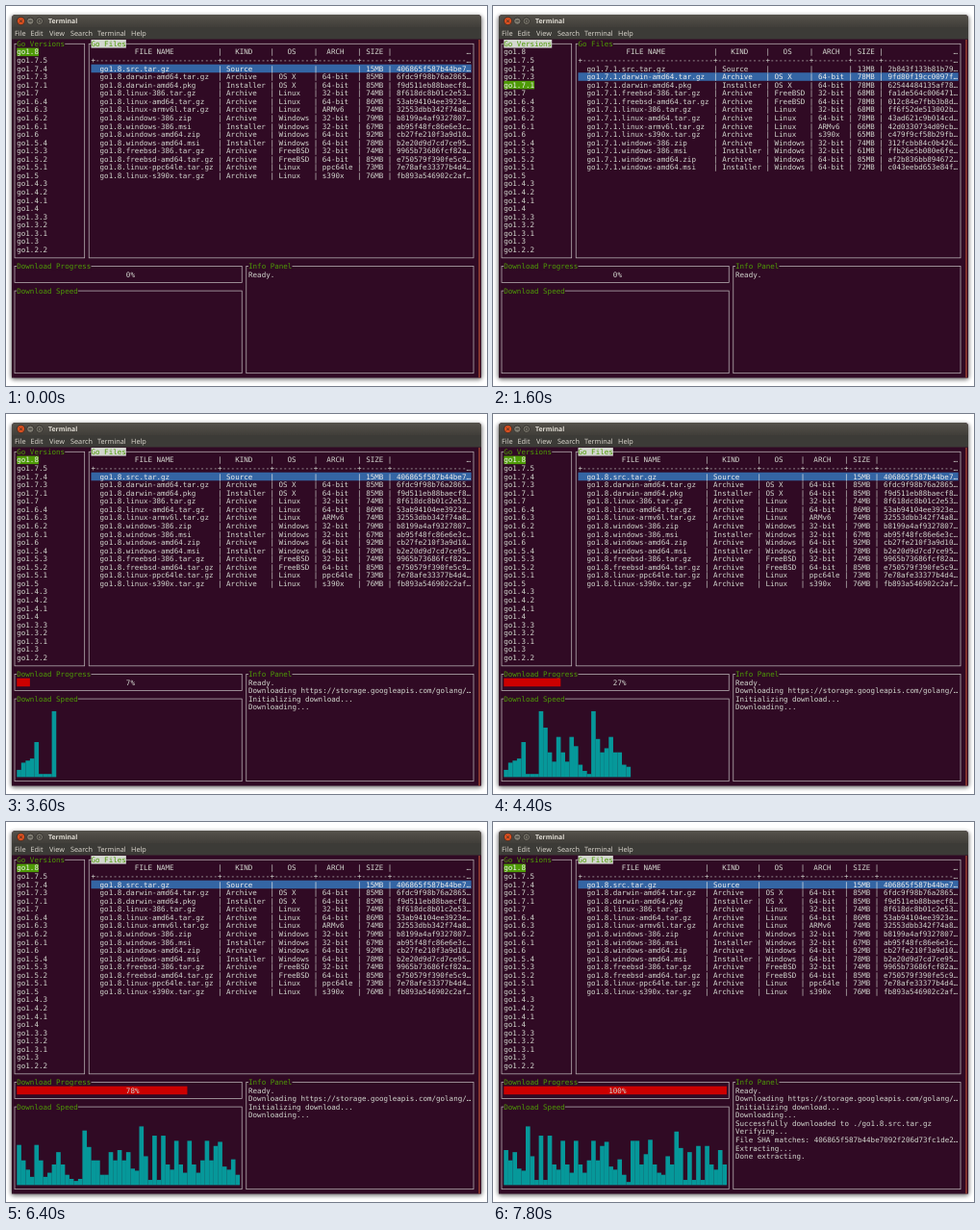
These frames come from a looping animation (500 by 395 pixels, 8 s). An HTML page:

```html
<!DOCTYPE html>
<html lang="en">
<head>
<meta charset="utf-8">
<title>Terminal</title>
<style>
  html, body { margin: 0; width: 100%; height: 100%; overflow: hidden; background: #fff; }
  svg { display: block; width: 500px; height: 395px; }
  text { white-space: pre; text-rendering: geometricPrecision; }
  #screen { font: 7.546px "DejaVu Sans Mono", monospace; }
  #chrome { font: 7.3px "Open Sans", sans-serif; fill: #dfdbd2; }
</style>
</head>
<body>
<svg viewBox="0 0 500 395">
  <defs>
    <linearGradient id="bar" x2="0" y2="1">
      <stop stop-color="#55524b"/><stop offset="1" stop-color="#3f3d38"/>
    </linearGradient>
    <filter id="blur"><feGaussianBlur stdDeviation="2.2"/></filter>
  </defs>
  <rect width="500" height="395" fill="#fff"/>
  <rect x="5" y="10" width="490" height="378.5" rx="4" fill="#000" opacity=".55" filter="url(#blur)"/>
  <path d="M6 386.4V13q0-4 4-4H490q4 0 4 4V386.4Z" fill="#300a24"/>
  <g id="chrome">
    <path d="M6 23V13q0-4 4-4H490q4 0 4 4V23Z" fill="url(#bar)"/>
    <rect x="6" y="22" width="488" height="12.5" fill="#3c3b37"/>
    <g stroke="#2b2925" stroke-width=".8">
      <circle cx="15.5" cy="15.7" r="4" fill="#e2511f"/>
      <circle cx="25.3" cy="15.7" r="3.7" fill="#7d7a70"/>
      <circle cx="34.8" cy="15.7" r="3.7" fill="#7d7a70"/>
      <path d="M14 14.2l3 3m0-3l-3 3M23.7 15.7h3.2M33.3 14.4h3v2.6h-3z" fill="none"/>
    </g>
    <text x="44" y="18.4" font-size="6.9" font-weight="700">Terminal</text>
    <text y="31"><tspan x="9">File</tspan><tspan x="25.5">Edit</tspan><tspan x="45">View</tspan><tspan x="67">Search</tspan><tspan x="95">Terminal</tspan><tspan x="130">Help</tspan></text>
  </g>
  <rect x="491.3" y="35" width="1.4" height="351.4" fill="#a0402f"/>
  <g id="screen"></g>
</svg>
<script>
const LOOP = 8000, TICK = 200;
const CELL = 4.543, ROW = 8.56, LEFT = 6.73, TOP = 35;
const BG = '#300a24', FG = '#d3d7cf', LINE = '#bcb6b8', GREEN = '#4e9a06', BLUE = '#3465a4', RED = '#cc0000', CYAN = '#06989a';

const versions = ('1.8 1.7.5 1.7.4 1.7.3 1.7.1 1.7 1.6.4 1.6.3 1.6.2 1.6.1 1.6 1.5.4 1.5.3 ' +
  '1.5.2 1.5.1 1.5 1.4.3 1.4.2 1.4.1 1.4 1.3.3 1.3.2 1.3.1 1.3 1.2.2').split(' ').map(v => 'go' + v);

const newest = `src.tar.gz 15 406865f587b44be7
darwin-amd64.tar.gz 85 6fdc9f98b76a2865
darwin-amd64.pkg 85 f9d511eb88baecf8
linux-386.tar.gz 74 8f618dc8b01c2e53
linux-amd64.tar.gz 86 53ab94104ee3923e
linux-armv6l.tar.gz 74 32553dbb342f74a8
windows-386.zip 79 b8199a4af9327807
windows-386.msi 67 ab95f48fc86e6e3c
windows-amd64.zip 92 cb27fe210f3a9d10
windows-amd64.msi 78 b2e20d9d7cd7ce95
freebsd-386.tar.gz 74 9965b73686fcf82a
freebsd-amd64.tar.gz 85 e750579f390fe5c9
linux-ppc64le.tar.gz 73 7e78afe33377b4d4
linux-s390x.tar.gz 76 fb893a546902c2af`;

const older = `src.tar.gz 13 2b843f133b81b79
darwin-amd64.tar.gz 78 9fd80f19cc0097f
darwin-amd64.pkg 78 62544484135af78
freebsd-386.tar.gz 68 fa1de564c006471
freebsd-amd64.tar.gz 78 012c84e7fbb3b8d
linux-386.tar.gz 68 ff6f52de513002b
linux-amd64.tar.gz 78 43ad621c9b014cd
linux-armv6l.tar.gz 66 42d0330734d09cb
linux-s390x.tar.gz 65 c479f9cf58b29fb
windows-386.zip 74 312fcbb84c0b426
windows-386.msi 61 ffb26e5b080e6fe
windows-amd64.zip 85 af2b836bb894672
windows-amd64.msi 72 c043eebd653e84f`;

// Download speed samples, in eighths of a text row
const speeds = [
  7, 14, 16, 18, 34, 3, 3, 3, 64, 48, 24, 15, 39, 24, 15, 39, 30, 12, 6, 3,
  64, 37, 24, 28, 39, 24, 24, 12, 10, 39, 24, 15, 8, 39, 24, 8, 12, 20, 32, 20,
  10, 6, 4, 6, 53, 37, 24, 24, 10, 10, 32, 24, 34, 24, 32, 16, 14, 57, 28, 5,
  48, 5, 48, 20, 15, 43, 20, 12, 43, 20, 12, 24, 43, 24, 38, 42, 18, 15, 25, 10,
  3, 43, 43, 20, 30, 44, 20, 12, 10, 28, 20, 52, 36, 5, 32, 5, 38, 5, 38, 20,
  15, 34, 20];

const messages = [
  [0, 'Ready.'],
  [3000, 'Downloading https://storage.googleapis.com/golang/…'],
  [3000, 'Initializing download...'],
  [3200, 'Downloading...'],
  [7400, 'Successfully downloaded to ./go1.8.src.tar.gz'],
  [7400, 'Verifying...'],
  [7400, 'File SHA matches: 406865f587b44be7092f206d73fc1de2…'],
  [7400, 'Extracting...'],
  [7600, 'Done extracting.']];

const colX = c => LEFT + c * CELL;
const rowY = r => TOP + r * ROW;
const rect = (x, y, w, h, fill) => `<rect x="${x}" y="${y}" width="${w}" height="${h}" fill="${fill}"/>`;
const cells = (c, r, n, fill) => rect(colX(c), rowY(r), n * CELL, ROW, fill);
const write = (c, r, s, fill = FG) => `<text x="${colX(c)}" y="${rowY(r) + 6.9}" fill="${fill}">${s}</text>`;

function box(c, r, cols, rows, title, active) {
  return `<rect x="${colX(c + .5)}" y="${rowY(r + .5)}" width="${(cols - 1) * CELL}" height="${(rows - 1) * ROW}"
    fill="none" stroke="${LINE}" stroke-width=".75"/>` +
    cells(c + 1, r, title.length, active ? FG : BG) + write(c + 1, r, title, GREEN);
}

function fakeHash(seed) {
  let s = '';
  for (let i = 0; i < 16; i++) {
    seed = (seed * 16807 + 12345) % 2147483647;
    s += (seed >> 9 & 15).toString(16);
  }
  return s;
}

function describe(file) {
  if (file.startsWith('src')) return ['Source', '', ''];
  const [os, arch] = file.split('.')[0].split('-');
  return [
    /pkg|msi/.test(file) ? 'Installer' : 'Archive',
    { darwin: 'OS X', linux: 'Linux', windows: 'Windows', freebsd: 'FreeBSD' }[os],
    { 386: '32-bit', amd64: '64-bit', armv6l: 'ARMv6' }[arch] || arch];
}

function center(s, width) {
  const before = Math.floor((width - s.length) / 2);
  return (' '.repeat(before) + s).padEnd(width);
}

const clip = s => s.length > 87 ? s.slice(0, 86) + '…' : s;

function fileTable(index) {
  const known = index === 0 || index === 4;
  const rows = (index ? older : newest).split('\n').map((line, i) => {
    const [file, size, hash] = line.split(' ');
    return [versions[index] + '.' + file, ...describe(file), size + 'MB',
      (known ? hash : fakeHash(index * 977 + i * 7919 + 1)).padEnd(40, '0')];
  });
  const head = ['FILE NAME', 'KIND', 'OS', 'ARCH', 'SIZE', ''];
  const widths = head.map((h, i) => Math.max(h.length, ...rows.map(row => row[i].length)));
  return [
    ' ' + head.map((h, i) => ' ' + center(h, widths[i]) + ' ').join('|'),
    '+' + widths.map(w => '-'.repeat(w + 2)).join('+'),
    ...rows.map(row => ' ' + row.map((v, i) => ' ' + v.padEnd(widths[i]) + ' ').join('|'))
  ].map(clip);
}

const tables = [0, 1, 2, 3, 4].map(fileTable);

// Tab, four steps down, Tab, one file down, Tab, four steps up, Tab
function selection(t) {
  const step = t / TICK;
  return {
    version: Math.max(0, Math.min(4, step - 1, 12 - step)),
    file: step === 7 || step === 8 ? 1 : 0,
    inVersions: step >= 1 && step < 6 || step >= 8 && step < 13
  };
}

function draw(t) {
  const { version, file, inVersions } = selection(t);
  let out = box(0, 0, 17, 27, 'Go Versions', inVersions) + box(17, 0, 89, 27, 'Go Files', !inVersions);

  out += cells(1, version + 1, versions[version].length, GREEN);
  versions.forEach((v, i) => out += write(1, i + 1, v, i === version ? '#eeeeec' : FG));

  out += cells(18, file + 3, 87, BLUE);
  tables[version].forEach((s, i) => out += write(18, i + 1, s, i === file + 2 ? '#eeeeec' : FG));

  const percent = Math.max(0, Math.min(100, Math.round((t - 3330) * .0255)));
  const label = percent + '%';
  out += box(0, 27, 53, 3, 'Download Progress') +
    cells(1, 28, Math.floor(percent * .51), RED) +
    write(27 - Math.floor(label.length / 2), 28, label);

  const count = Math.max(0, Math.min(speeds.length, Math.round((t - 3240) * .0252)));
  out += box(0, 30, 53, 11, 'Download Speed');
  speeds.slice(Math.max(0, count - 51), count).forEach((v, i) => {
    const h = v * ROW / 8;
    out += rect(colX(i + 1), rowY(40) - h, CELL + .1, h, CYAN);
  });

  out += box(53, 27, 53, 14, 'Info Panel');
  messages.filter(([at]) => t >= at).forEach(([, s], i) => out += write(54, 28 + i, s));
  return out;
}

const screen = document.getElementById('screen');
let shown = -1;

function frame() {
  const t = Math.floor(performance.now() % LOOP / TICK) * TICK;
  if (t !== shown) screen.innerHTML = draw(shown = t);
  requestAnimationFrame(frame);
}
frame();
</script>
</body>
</html>
```
